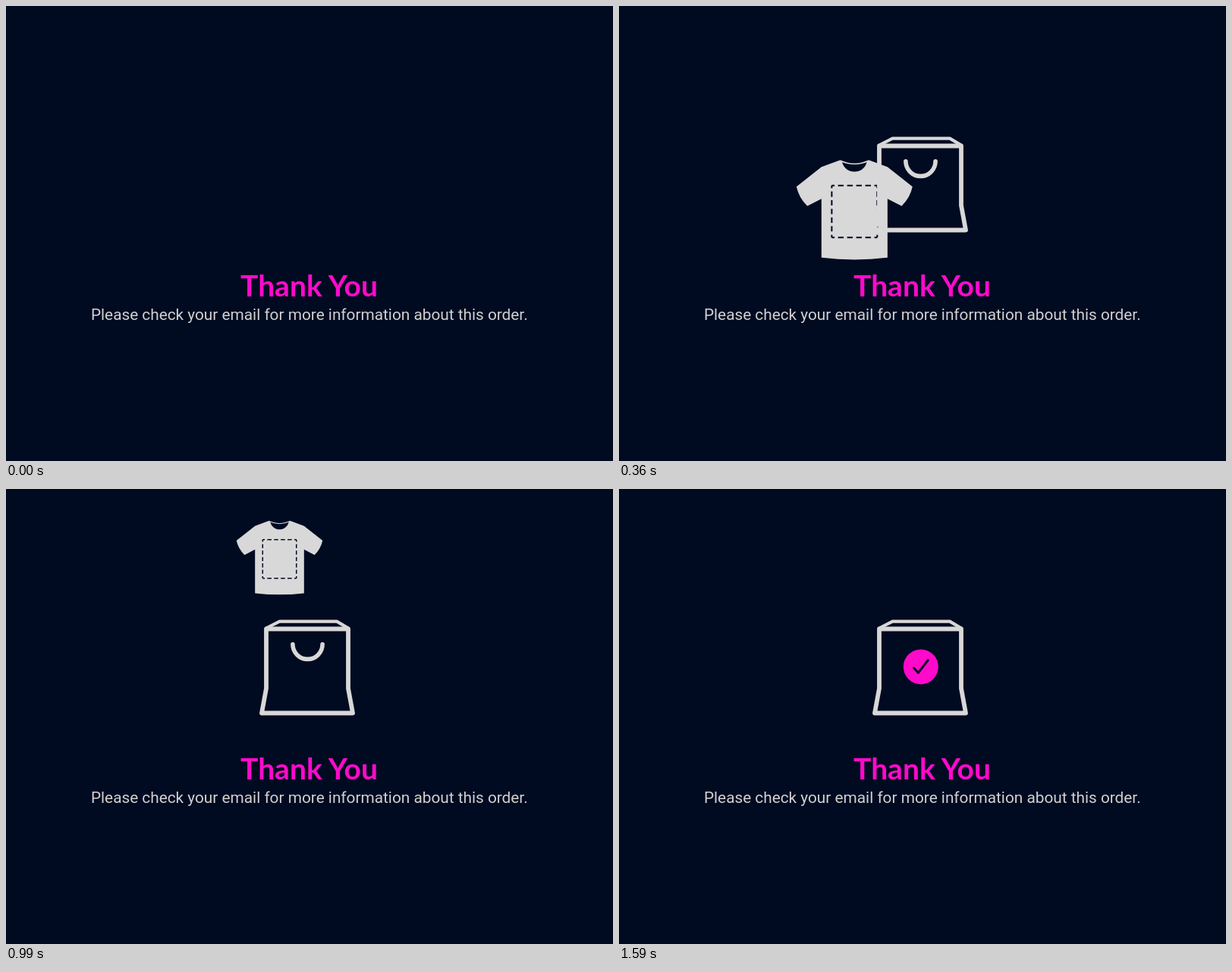
Animation of 800 by 600 pixels, one loop 1800 ms. Source, as an HTML page with a canvas:

```html
<!DOCTYPE html>
<html lang="en">
<head>
<meta charset="utf-8">
<title>Thank You</title>
<style>
  html, body { margin: 0; width: 100%; height: 100%; overflow: hidden; background: #000a21; }
  canvas, svg { position: absolute; left: 0; top: 0; width: 800px; height: 600px; }
  text { text-anchor: middle; }
  .title { font: 700 39px Lato, sans-serif; fill: #ff0acb; }
  .note { font: 400 20.8px Roboto, sans-serif; fill: #d0d0d0; }
</style>
</head>
<body>
<canvas id="stage" width="800" height="600"></canvas>
<svg viewBox="0 0 800 600">
  <text class="title" x="399.5" y="382.5">Thank You</text>
  <text class="note" x="399.8" y="414">Please check your email for more information about this order.</text>
</svg>
<script>
const ctx = document.getElementById('stage').getContext('2d');
const LOOP = 1800, STEP = 30, LAST = 1590;
const LIGHT = '#d8d8d8', PINK = '#ff0acb', DARK = '#000a21';
const SHIRT_WIDTH = 144, SHIRT_HEIGHT = 123.5;
const RIM_Y = 184.5, ENTER_BAG = 1035;

// time, centre x, centre y, width
const shirtPath = [
  [300, 310.4, 268.7, 153.3],
  [400, 310.3, 268.7, 152],
  [540, 310, 266.2, 144],
  [660, 312.3, 222, 136.2],
  [780, 320, 166.4, 128],
  [900, 339, 116, 119.5],
  [990, 360.5, 90.7, 113.5],
  [1035, 376, 87.4, 111],
  [1080, 389.3, 102.3, 108.6],
  [1260, 397.8, 177, 101],
  [1410, 397.8, 242, 98]
];

const clamp = v => Math.max(0, Math.min(1, v));
const progress = (t, from, to) => clamp((t - from) / (to - from));
const easeOut = p => 1 - (1 - p) ** 3;

// Cubic Hermite interpolation with finite-difference tangents.
function along(keys, t) {
  const end = keys.length - 1;
  if (t <= keys[0][0]) return keys[0].slice(1);
  if (t >= keys[end][0]) return keys[end].slice(1);
  const i = keys.findIndex(k => k[0] > t) - 1;
  const a = keys[i], b = keys[i + 1], span = b[0] - a[0], u = (t - a[0]) / span;
  const slope = (k, c) => {
    const p = keys[Math.max(0, k - 1)], n = keys[Math.min(end, k + 1)];
    return (n[c] - p[c]) / (n[0] - p[0]) * span;
  };
  return [1, 2, 3].map(c =>
    a[c] + (b[c] - a[c]) * u * u * (3 - 2 * u) +
    slope(i, c) * u * (1 - u) ** 2 - slope(i + 1, c) * u * u * (1 - u));
}

function polyline(points, width, closed) {
  ctx.lineWidth = width;
  ctx.beginPath();
  points.forEach(([x, y]) => ctx.lineTo(x, y));
  if (closed) ctx.closePath();
  ctx.stroke();
}

function dashedSide(x1, y1, x2, y2, count) {
  const period = Math.hypot(x2 - x1, y2 - y1) / count, dash = period * 0.62;
  ctx.setLineDash([dash, period - dash]);
  ctx.lineDashOffset = dash / 2;
  polyline([[x1, y1], [x2, y2]], 1.9);
}

function drawShirt(t) {
  const [x, y, width] = along(shirtPath, t);
  const rise = 37 * (1 - progress(t, 0, 300));
  ctx.save();
  if (t > ENTER_BAG) {
    ctx.beginPath();
    ctx.rect(0, 0, 800, RIM_Y);
    ctx.clip();
  }
  ctx.translate(x, y + rise);
  ctx.scale(width / SHIRT_WIDTH, width / SHIRT_WIDTH);
  ctx.translate(0, -SHIRT_HEIGHT / 2);
  ctx.globalAlpha = progress(t, 0, 335);
  ctx.fillStyle = ctx.strokeStyle = LIGHT;

  ctx.beginPath();
  ctx.moveTo(-18, 0);
  ctx.lineTo(-15.5, 1.5);
  ctx.bezierCurveTo(-12, 18.5, 12, 18.5, 15.5, 1.5);
  ctx.lineTo(18, 0);
  ctx.lineTo(41, 8.5);
  ctx.lineTo(72, 33);
  ctx.quadraticCurveTo(69, 47, 58.5, 57);
  ctx.lineTo(41, 48);
  ctx.lineTo(41, 121);
  ctx.quadraticCurveTo(0, 126, -41, 121);
  ctx.lineTo(-41, 48);
  ctx.lineTo(-58.5, 57);
  ctx.quadraticCurveTo(-69, 47, -72, 33);
  ctx.lineTo(-41, 8.5);
  ctx.closePath();
  ctx.fill();

  ctx.lineWidth = 1.5;
  ctx.beginPath();
  ctx.moveTo(-17.5, 0.7);
  ctx.quadraticCurveTo(0, 8.7, 17.5, 0.7);
  ctx.stroke();

  // The print area is cut out of the fabric.
  ctx.globalCompositeOperation = 'destination-out';
  ctx.globalAlpha = 1;
  ctx.lineCap = 'butt';
  dashedSide(-28.2, 31.5, 28.2, 31.5, 5);
  dashedSide(-28.2, 96, 28.2, 96, 5);
  dashedSide(-28.2, 31.5, -28.2, 96, 6);
  dashedSide(28.2, 31.5, 28.2, 96, 6);
  ctx.restore();
}

function drawBag(t) {
  const squash = Math.sin(Math.PI * progress(t, 1320, 1530));
  ctx.save();
  ctx.translate(397, 298.5 - 30 * (1 - progress(t, 0, 300)));
  ctx.scale(1 + 0.06 * squash, 1 - 0.05 * squash);
  ctx.translate(-397, -298.5);
  ctx.globalAlpha = progress(t, 0, 300);
  ctx.strokeStyle = LIGHT;
  ctx.lineJoin = ctx.lineCap = 'round';

  // One path, so that overlapping strokes stay even while fading in.
  ctx.lineWidth = 5.8;
  ctx.beginPath();
  ctx.moveTo(343, RIM_Y);
  ctx.lineTo(451, RIM_Y);
  ctx.lineTo(451, 263);
  ctx.lineTo(457, 295.5);
  ctx.lineTo(337, 295.5);
  ctx.lineTo(343, 263);
  ctx.closePath();
  ctx.stroke();
  polyline([[343, 183.5], [360.5, 174.6], [436, 174.6], [451, 183.5]], 4.2);

  ctx.globalAlpha *= 1 - progress(t, 1350, 1440);
  ctx.lineWidth = 5.6;
  ctx.beginPath();
  ctx.arc(397.5, 204.8, 19.6, Math.PI, 0, true);
  ctx.stroke();
  ctx.restore();
}

function drawCheck(t) {
  const size = easeOut(progress(t, 1380, LAST));
  if (!size) return;
  ctx.save();
  ctx.translate(397.8, 234.4);
  ctx.scale(size, size);
  ctx.fillStyle = PINK;
  ctx.beginPath();
  ctx.arc(0, 0, 23, 0, 2 * Math.PI);
  ctx.fill();
  ctx.strokeStyle = DARK;
  ctx.lineCap = ctx.lineJoin = 'round';
  polyline([[-9.3, 1.6], [-3.3, 8], [9.5, -8.7]], 3);
  ctx.restore();
}

function frame(now) {
  const t = Math.min(LAST, Math.floor((now % LOOP) / STEP) * STEP);
  ctx.clearRect(0, 0, 800, 600);
  drawShirt(t);
  drawBag(t);
  drawCheck(t);
}

const start = performance.now();
(function tick() {
  frame(performance.now() - start);
  requestAnimationFrame(tick);
})();
</script>
</body>
</html>
```
